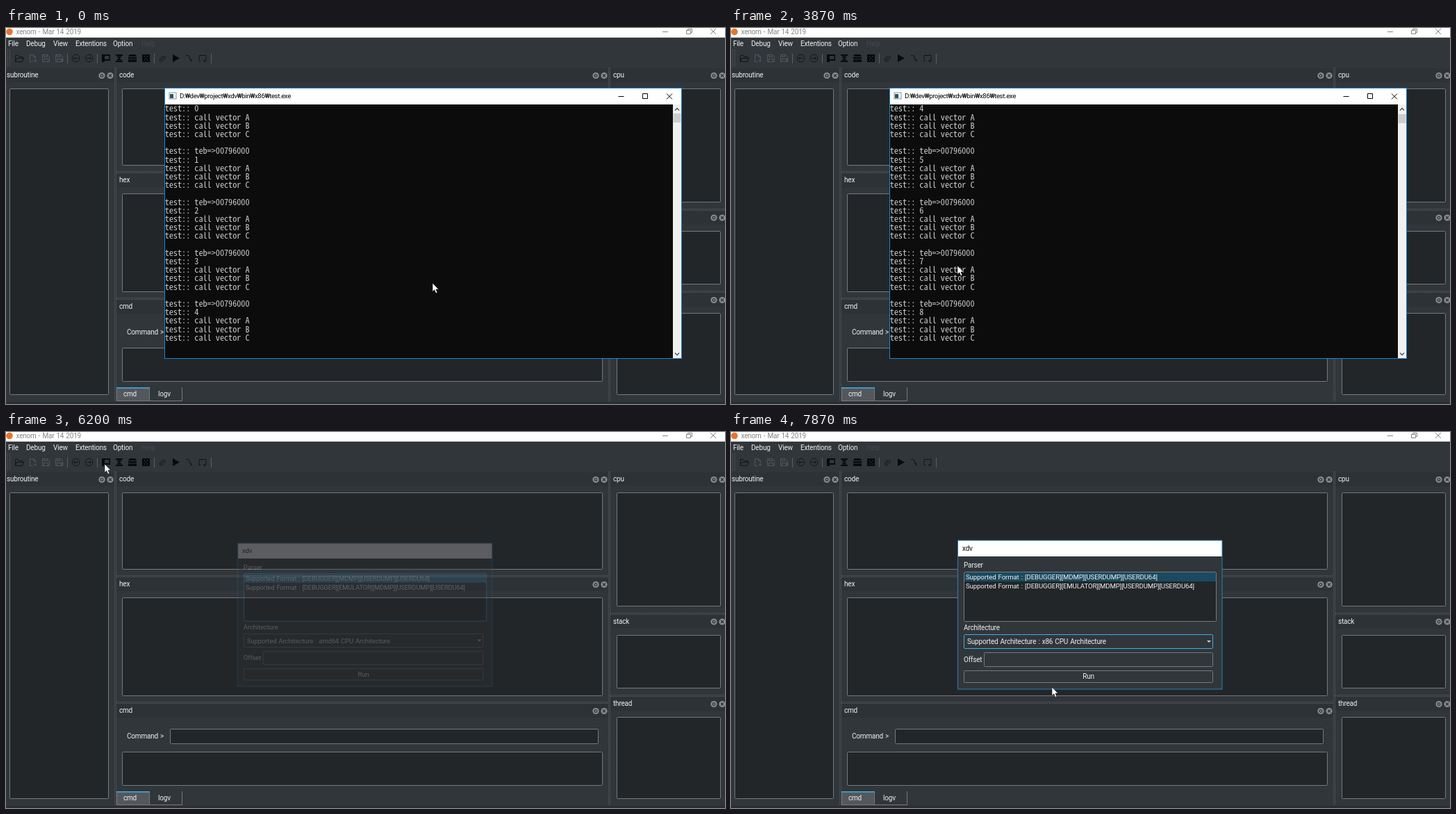
Write an HTML page that moves like this. It is 1035 px wide and 541 px high and loops after 8 s.

```html
<!DOCTYPE html>
<html lang="en">
<head>
<meta charset="utf-8">
<title>Debugger session</title>
<style>
html, body { margin: 0; width: 100%; height: 100%; overflow: hidden; background: #31363b; }
svg { display: block; }
text { font: 10px Roboto, "Liberation Sans", sans-serif; letter-spacing: -.2px; word-spacing: .8px; fill: #eff0f1; white-space: pre; }
.list text { font-size: 9.6px; letter-spacing: -.1px; }
text.path { font-size: 9.6px; letter-spacing: -.37px; fill: #000; }
.console text { font-family: "Noto Sans Mono CJK KR", "Liberation Mono", monospace; letter-spacing: 0; word-spacing: 0; fill: #ccc; }
.box { fill: #232629; stroke: #76797c; }
.box.flat { fill: #31363b; }
.line { fill: none; stroke: #111416; }
.off { fill: none; stroke: #50565b; }
.dots { stroke: #60666a; stroke-dasharray: 1 1.3; }
</style>
</head>
<body>
<script>
const LOOP = 8000, BLUE = '#3daee9';

// Drawing helpers
const fill = (x, y, w, h, c, extra = '') => `<rect x="${x}" y="${y}" width="${w}" height="${h}" fill="${c}" ${extra}/>`;
const box = (x1, y1, x2, y2, extra = '', kind = '') =>
  `<rect class="box ${kind}" x="${x1 + .5}" y="${y1 + .5}" width="${x2 - x1 - 1}" height="${y2 - y1 - 1}" rx="1" ${extra}/>`;
const text = (x, y, s, extra = '') => `<text x="${x}" y="${y}" ${extra}>${s.replace(/>/g, '&gt;')}</text>`;
const path = (d, extra = 'class="line"') => `<path d="${d}" ${extra}/>`;
const group = (id, body, extra = '') => `<g id="${id}" ${extra}>${body}</g>`;

function dockButtons(x, y) {
  return `<circle cx="${x}" cy="${y}" r="4.6" fill="#8b8e90"/><circle cx="${x}" cy="${y}" r="1.9" fill="none" stroke="#2b3034" stroke-width="1.2"/>
    <circle cx="${x + 12}" cy="${y}" r="4.6" fill="#8b8e90"/>` +
    path(`M${x + 10} ${y - 2}l4 4m0-4l-4 4`, 'stroke="#2b3034" stroke-width="1.2"');
}

function dock(name, x, right, y, buttonX, frame) {
  return fill(x, y - 10, right - x, 20, '#2d3236') + text(x + 4 - (x ? 0 : 3), y + 3.3, name) +
    dockButtons(buttonX, y + .5) + box(...frame);
}

function toolbar() {
  const seps = [88, 131, 213, 295].map(x => `M${x + .5} 37V51`).join('');
  return path('M2.5 31V56M5.5 31V56', 'class="dots"') + path(seps, 'stroke="#5b6064"') +
    path('M13.5 48.5V39.5h4l1.5 2h5v2M13.5 48.5l2-5h10l-2 5z') +
    path('M34.5 38.5h5l3 3v3M34.5 38.5v10h4M39.5 38.5v3h3M40 47h4m-2-2v4', 'class="off"') +
    path('M52.5 38.5h7l3 3v7h-10zM54.5 38.5v3h5v-3M54.5 48.5v-4h6v4', 'class="off"') +
    path('M71.5 38.5h7l3 3v7h-10zM73.5 38.5v3h4v-3M73.5 48.5v-4h6v4M79 46h4m-2-2v5', 'class="off"') +
    [100.5, 119.5].map((x, i) => `<circle class="line" cx="${x}" cy="43.5" r="5.3"/>` +
      path(`M${x - 3} 43.5h6M${x + (i ? 1 : -1)} 41.5l${i ? 2 : -2} 2l${i ? -2 : 2} 2`)).join('') +
    path('M138 38h12v9h-8v2h-4zM142 40v5h6.5v-5z', 'fill="#080a0b" fill-rule="evenodd"') +
    path('M158 39h10M158 48h10M160 41.5h6M160 45.5h6M163 41v5', 'stroke="#080a0b" stroke-width="1.8"') +
    path('M178 38h8l2 3h-12zM176 42h12v2.5h-12zM176 45.5h12v3.5h-12z', 'fill="#080a0b"') +
    fill(196, 38, 11, 11, '#080a0b') + path('M199 41h1m3 0h1m-3 2.5h1m-3 2.5h1m3 0h1', 'stroke="#555b60"') +
    path('M223 46l4.5-5q1.5-1 2 .5t-4.5 6q-2.5 2-3.5-.5t4.5-7') +
    path('M240 38v11l10-5.5z', 'fill="#080a0b"') +
    path('M259 39.5h3q2 0 2 3t2 4h2M265.5 44.5l2.5 2-2.5 2') +
    path('M280 47.5h-2v-8h10v8h-3M286.5 45.5l-2 2 2 2');
}

function mainWindow() {
  const menu = [[3, 'File'], [29, 'Debug'], [68, 'View'], [100, 'Extentions'], [154, 'Option']];
  return fill(0, 0, 1035, 541, '#31363b') + fill(0, 0, 1035, 13.75, '#fff') +
    '<circle cx="5" cy="5.5" r="4.8" fill="#e8742c"/>' +
    group('titleBar', text(14.5, 9.3, 'xenom - Mar 14 2019') +
      path('M945 5.5h8M979.5 3.5h6v5h-6zM981.5 3.5v-2h6v5h-2M1014 1l8 8m0-8l-8 8', 'fill="none"')) +
    menu.map(([x, s]) => text(x, 26, s)).join('') + text(195, 26, 'Help', 'style="fill:#42484d"') + toolbar() +
    dock('subroutine', 0, 156, 68, 138, [5, 87, 148, 528]) +
    dock('code', 159, 867, 68, 849, [167, 87, 859, 198]) +
    dock('hex', 159, 867, 219, 849, [167, 238, 859, 380]) +
    dock('cmd', 159, 867, 401, 849, [167, 460, 859, 509]) +
    dock('cpu', 870, 1035, 68, 1019, [879, 87, 1029, 251]) +
    dock('stack', 870, 1035, 272.5, 1019, [879, 292, 1029, 369]) +
    dock('thread', 870, 1035, 391, 1019, [879, 410, 1029, 528]) +
    path('M156.5 57V537M158.5 57V537M867.5 57V537M869.5 57V537M159 206.5H867M159 208.5H867M159 388.5H867M159 390.5H867M870 260.5H1035M870 262.5H1035M870 378.5H1035M870 380.5H1035', 'class="dots"') +
    text(174, 441, 'Command >') + box(236, 427, 853, 449, 'id="input"') +
    fill(242, 433, 1, 10, '#eff0f1', 'id="caret"') +
    fill(159, 517, 48, 20, '#54575b') + fill(159, 517, 48, 1.5, BLUE) +
    path('M159.5 518V536.5H253.5V517M206.5 518V536', 'fill="none" stroke="#76797c"') +
    text(169, 530.3, 'cmd') + text(219, 529.5, 'logv') + fill(0, 538, 1035, 3, '#2a2e32');
}

function consoleWindow() {
  const kinds = ['test:: 0', 'test:: call vector A', 'test:: call vector B', 'test:: call vector C', '', 'test:: teb=>00796000'];
  let lines = '';
  for (let i = 0; i < 28; i++) {
    const s = kinds[i % 6];
    if (s) lines += text(228.7, (120.3 + i * 12.2).toFixed(1), s, i % 6 ? '' : 'data-count');
  }
  return fill(228, 86, 745, 390, '#1883d7') + fill(229, 87, 743, 23, '#fff') + fill(229, 110, 731, 365, '#0c0c0c') +
    fill(235, 93, 10, 9, '#fff', 'stroke="#8a8f94"') + fill(236, 95, 5, 6, '#27576b') +
    text(250, 101.3, 'D:₩dev₩project₩xdv₩bin₩x86₩test.exe', 'class="path"') +
    path('M881.5 98.5h8M916.5 94.5h7v7h-7zM951 94.5l8 8m0-8l-8 8', 'fill="none" stroke="#000"') +
    fill(960, 110, 12, 365, '#f0f0f0') + fill(960.5, 123, 11, 13, '#cdcdcd', 'id="thumb"') +
    path('M963 118.5l3-3 3 3M963 467.5l3 3 3-3', 'fill="none" stroke="#505050" stroke-width="1.3"') +
    group('lines', lines, 'class="console"') + fill(228.7, 472.3, 6.2, 3, '#f2f2f2', 'id="block"');
}

const archName = cpu => `Supported Architecture : ${cpu} CPU Architecture`;

function dialog() {
  return fill(326, 155.5, 381.5, 215, '#2980b9') + fill(327, 156.5, 379.5, 22.5, '#fff') + fill(327, 179, 379.5, 190.5, '#31363b') +
    text(333, 170.8, 'xdv', 'style="fill:#111"') + text(335, 195, 'Parser') +
    box(335, 201, 699, 273, 'id="listBox"') + fill(336, 202, 362, 13, '#2d7397', 'id="pick"') +
    group('list', text(338, 212.3, 'Supported Format : [DEBUGGER][MDMP][USERDUMP][USERDU64]') +
      text(338, 225.2, 'Supported Format : [DEBUGGER][EMULATOR][MDMP][USERDUMP][USERDU64]'), 'class="list"') +
    text(335, 285.3, 'Architecture') + box(335, 291, 694, 312, 'id="combo"', 'flat') + text(340, 305.2, '', 'id="arch"') +
    path('M685 300h6l-3 3z', 'fill="#cfd1d2"') + text(335, 331, 'Offset') + box(364, 317, 694, 338, '', 'flat') +
    box(335, 343, 694, 361, '', 'flat') + text(514.5, 355.3, 'Run', 'text-anchor="middle"') +
    group('popup', box(335, 312, 696, 341) + fill(336, 326, 359, 14, '#2d7397') +
      text(340, 323, archName('amd64')) + text(340, 336.5, archName('x86')));
}

document.body.innerHTML = `<svg width="1035" height="541" viewBox="0 0 1035 541">${mainWindow()}
  ${group('console', consoleWindow())}${group('dialog', dialog())}
  ${path('M0 0V12.2l2.8-2.5 2 4.7 2.1-.9-2-4.5H8.6z', 'id="mouse" fill="#fff" stroke="#000" stroke-width=".5"')}</svg>`;

const $ = id => document.getElementById(id);
const counters = document.querySelectorAll('[data-count]');

// Console cells are 6.1px wide whichever monospace font is present.
const pen = document.createElement('canvas').getContext('2d');
pen.font = '100px "Noto Sans Mono CJK KR", "Liberation Mono", monospace';
const consoleSize = 610 / pen.measureText('0').width;
$('lines').querySelectorAll('text').forEach(el => el.style.fontSize = consoleSize + 'px');

// Rows of time, then values
const mousePath = [
  [0, 614, 367], [250, 614, 367], [1930, 266, 426], [1999, 266, 426], [2000, 284, 425], [2600, 284, 425], [2670, 285, 425],
  [3620, 285, 425], [4470, 480, 30], [4530, 482, 28], [4730, 489, 22], [5220, 489, 22], [6000, 142, 46],
  [6250, 142, 46], [6930, 497, 297], [7000, 496, 299], [7400, 486, 326], [7590, 486, 326], [7870, 462, 367], [LOOP, 462, 367]
];
const fade = [[0, 0, .94], [6130, 0, .94], [6200, .25, .962], [6270, .6, .98], [6340, .88, .994], [6410, 1, 1], [LOOP, 1, 1]];

const smooth = k => k * k * (3 - 2 * k);
function sample(rows, t, ease = k => k) {
  const i = rows.findIndex(r => r[0] > t), a = rows[i - 1], b = rows[i];
  const k = ease((t - a[0]) / (b[0] - a[0]));
  return [1, 2].map(j => a[j] + (b[j] - a[j]) * k);
}
const show = (id, on) => $(id).style.display = on ? '' : 'none';
const between = (t, a, b) => t >= a && t < b;

function draw(t) {
  const [mx, my] = sample(mousePath, t, smooth);
  $('mouse').setAttribute('transform', `translate(${mx.toFixed(2)} ${my.toFixed(2)})`);

  show('console', t < 5130);
  const count = Math.max(0, Math.floor((t - 570) / 1030) + 1);
  counters.forEach((el, i) => el.textContent = 'test:: ' + (count + i));
  $('thumb').setAttribute('y', t < 1600 ? 123 : 124);
  show('block', t >= 270 && Math.floor((t - 270) / 1066) % 2 === 0);

  const active = between(t, 5130, 6130), ink = active ? '#000' : '#858585';
  $('titleBar').firstChild.style.fill = ink;
  $('titleBar').lastChild.style.stroke = ink;
  $('input').style.stroke = active ? BLUE : '';
  show('caret', between(t, 5130, 5660));

  const [alpha, scale] = sample(fade, t);
  $('dialog').style.opacity = alpha;
  $('dialog').setAttribute('transform', `translate(517 263) scale(${scale}) translate(-517 -263)`);
  const comboFocus = t >= 7130;
  $('listBox').style.stroke = comboFocus ? '' : BLUE;
  $('pick').style.fill = comboFocus ? '#1b4a60' : '';
  $('combo').style.stroke = t >= 6800 ? BLUE : '';
  show('popup', between(t, 7130, 7600));
  $('arch').textContent = archName(t < 7600 ? 'amd64' : 'x86');
}

const start = performance.now();
function tick() {
  draw((performance.now() - start) % LOOP);
  requestAnimationFrame(tick);
}
tick();
</script>
</body>
</html>
```
